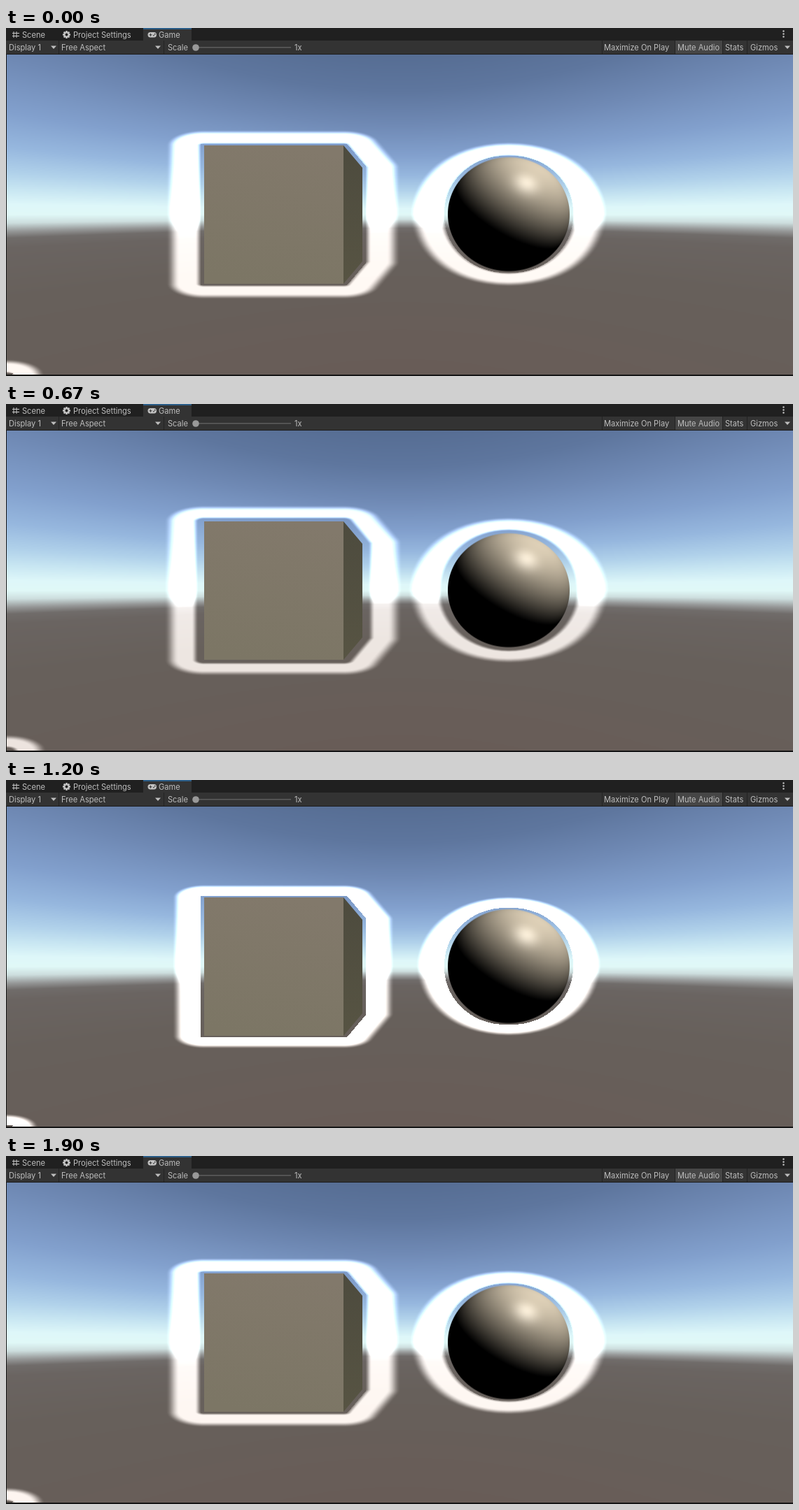
An HTML page with a canvas that plays this animation: 1124x498 px, repeating every 1.93 s.

```html
<!DOCTYPE html>
<html lang="en">
<head>
<meta charset="utf-8">
<title>Outline glow</title>
<style>
  html, body { margin: 0; width: 100%; height: 100%; overflow: hidden; background: #161616; }
  canvas { display: block; }
</style>
</head>
<body>
<canvas id="stage" width="1124" height="498"></canvas>
<script>
const W = 1124, H = 498, LOOP = 1930, STEP = 100 / 3;
const VIEW = { x: 1, y: 38, w: 1123, h: 458 };
const ASPECT = 2.45;            // the glow spreads this much wider than high
const REACH = 60, GAP = 5;
const ctx = document.getElementById('stage').getContext('2d');

const clamp = (v, a, b) => Math.min(b, Math.max(a, v));
const smooth = (a, b, v) => {
  const k = clamp((v - a) / (b - a), 0, 1);
  return k * k * (3 - 2 * k);
};

// ---- sky and ground: colour by elevation angle in degrees ----
const SKY = [
  [-30, 104, 92, 87], [-10, 103, 96, 91], [-4, 106, 100, 97], [-2.8, 112, 108, 106],
  [-2, 150, 152, 152], [-1, 205, 222, 222], [0, 224, 248, 247], [1.2, 222, 247, 249],
  [3, 200, 230, 242], [5, 176, 209, 234], [8, 150, 183, 222], [12, 130, 160, 205],
  [18, 111, 137, 180], [24, 94, 118, 158], [30, 86, 109, 147]
];

function skyColor(angle) {
  let i = 1;
  while (i < SKY.length - 1 && SKY[i][0] < angle) i++;
  const a = SKY[i - 1], b = SKY[i];
  const k = clamp((angle - a[0]) / (b[0] - a[0]), 0, 1);
  return [1, 2, 3].map(c => a[c] + (b[c] - a[c]) * k);
}

function makeBackdrop() {
  const img = ctx.createImageData(VIEW.w, VIEW.h);
  for (let y = 0; y < VIEW.h; y++) {
    for (let x = 0; x < VIEW.w; x++) {
      const angle = Math.atan2(VIEW.h / 2 - y - 0.5, Math.hypot(397, x - VIEW.w / 2)) * 180 / Math.PI;
      const [r, g, b] = skyColor(angle);
      img.data.set([r, g, b, 255], (y * VIEW.w + x) * 4);
    }
  }
  return img;
}

// ---- silhouettes, clockwise ----
const BALL = { x: 718, y: 266.5, rx: 87, ry: 81.5 };
const cube = [[283, 168], [482, 168], [509, 200], [509, 334], [482, 366], [283, 366]];
const ball = Array.from({ length: 72 }, (_, i) => {
  const a = i / 72 * Math.PI * 2;
  return [BALL.x + BALL.rx * Math.cos(a), BALL.y + BALL.ry * Math.sin(a)];
});
const corner = [[-6, 496], [1, 496], [-6, 502]];

function toEdges(points) {
  const p = points.map(([x, y]) => [x, y * ASPECT]);
  return p.map(([x, y], i) => {
    const [x2, y2] = p[(i + 1) % p.length];
    const dx = x2 - x, dy = y2 - y, len = Math.hypot(dx, dy);
    return { x, y, dx, dy, len2: len * len, nx: dy / len, ny: -dx / len };
  });
}

// Distance outside the shape, or -1 inside its inflated silhouette
function distance(edges, px, py) {
  let best = Infinity, inside = true;
  for (const e of edges) {
    const qx = px - e.x, qy = py - e.y;
    if (qx * e.nx + qy * e.ny > GAP * (Math.abs(e.nx) + Math.abs(e.ny))) inside = false;
    const k = clamp((qx * e.dx + qy * e.dy) / e.len2, 0, 1);
    const ax = qx - k * e.dx, ay = qy - k * e.dy;
    best = Math.min(best, ax * ax + ay * ay);
  }
  return inside ? -1 : Math.sqrt(best);
}

function makeField() {
  const near = new Float32Array(VIEW.w * VIEW.h).fill(REACH);
  for (const points of [cube, ball, corner]) {
    const edges = toEdges(points);
    const xs = points.map(p => p[0] - VIEW.x), ys = points.map(p => p[1] - VIEW.y);
    const x0 = Math.max(0, Math.floor(Math.min(...xs) - REACH));
    const x1 = Math.min(VIEW.w, Math.ceil(Math.max(...xs) + REACH));
    const y0 = Math.max(0, Math.floor(Math.min(...ys) - REACH / ASPECT));
    const y1 = Math.min(VIEW.h, Math.ceil(Math.max(...ys) + REACH / ASPECT));
    for (let y = y0; y < y1; y++) {
      for (let x = x0; x < x1; x++) {
        const d = distance(edges, x + VIEW.x + 0.5, (y + VIEW.y + 0.5) * ASPECT);
        const i = y * VIEW.w + x;
        near[i] = Math.min(near[i], d);
      }
    }
  }
  const cells = [];
  near.forEach((d, i) => { if (d >= 0 && d < REACH) cells.push(i); });
  return { near, cells };
}

// ---- solids ----
function makeBall() {
  const c = document.createElement('canvas');
  c.width = 180; c.height = 170;
  const g = c.getContext('2d'), img = g.createImageData(180, 170);
  for (let y = 0; y < 170; y++) {
    for (let x = 0; x < 180; x++) {
      let nx = (x + 0.5 - 90) / BALL.rx, ny = (85 - y - 0.5) / BALL.ry;
      const r = Math.hypot(nx, ny);
      if (r > 1) { nx /= r; ny /= r; }
      const nz = Math.sqrt(Math.max(0, 1 - nx * nx - ny * ny));
      const light = Math.max(0, nx * 0.5 + ny * 0.79 + nz * 0.35);
      const shine = Math.pow(Math.max(0, nx * 0.28 + ny * 0.53 + nz * 0.8), 45) * 62;
      const alpha = clamp((1 - r) * 84 + 0.5, 0, 1) * 255;
      img.data.set([222 * light + shine, 208 * light + shine, 183 * light + shine, alpha], (y * 180 + x) * 4);
    }
  }
  g.putImageData(img, 0, 0);
  return c;
}

function fillPoly(points, fill) {
  ctx.fillStyle = fill;
  ctx.beginPath();
  points.forEach(([x, y]) => ctx.lineTo(x, y));
  ctx.fill();
}

function shade(x0, y0, x1, y1, from, to) {
  const g = ctx.createLinearGradient(x0, y0, x1, y1);
  g.addColorStop(0, from);
  g.addColorStop(1, to);
  return g;
}

function drawSolids() {
  fillPoly([cube[0], cube[1], cube[4], cube[5]], shade(400, 168, 360, 366, '#82796b', '#7c7665'));
  fillPoly(cube.slice(1, 5), shade(0, 168, 0, 366, '#4d4b3e', '#575443'));
  ctx.drawImage(ballImage, BALL.x - 90, BALL.y - 85);
}

// ---- editor bars ----
const rect = (x, y, w, h, fill) => { ctx.fillStyle = fill; ctx.fillRect(x, y, w, h); };
const dot = (x, y, r, fill) => {
  ctx.fillStyle = fill;
  ctx.beginPath();
  ctx.arc(x, y, r, 0, Math.PI * 2);
  ctx.fill();
};
const label = (s, x, y) => { ctx.fillStyle = '#bebebe'; ctx.fillText(s, x, y); };
const arrow = x => fillPoly([[x - 4, 25.5], [x + 4, 25.5], [x, 30]], '#bebebe');

function drawIcons() {
  const ink = '#c4c4c4';
  for (const o of [0, 4]) {
    rect(10.5 + o, 5, 1, 9, ink);
    rect(9, 7 + o, 10, 1, ink);
  }
  ctx.strokeStyle = ink;
  ctx.lineWidth = 2.4;
  for (let i = 0; i < 4; i++) {
    const a = i * Math.PI / 4, c = Math.cos(a) * 5.5, s = Math.sin(a) * 5.5;
    ctx.beginPath();
    ctx.moveTo(86.5 - c, 9.5 - s);
    ctx.lineTo(86.5 + c, 9.5 + s);
    ctx.stroke();
  }
  dot(86.5, 9.5, 4.3, ink);
  dot(86.5, 9.5, 1.9, '#202020');
  ctx.fillStyle = ink;
  ctx.beginPath();
  ctx.roundRect(202.5, 6, 12.5, 7.5, 3.7);
  ctx.fill();
  rect(204.5, 9.3, 4, 1, '#333');
  rect(206, 7.8, 1, 4, '#333');
  dot(211, 10.6, 0.9, '#333');
  dot(212.7, 8.7, 0.9, '#333');
}

function drawBars() {
  rect(0, 0, W, H, '#161616');
  rect(0, 0, W, 18, '#202020');
  rect(0, 18, W, 19, '#333');
  rect(196, 0, 69, 18, '#333');
  rect(196, 0, 69, 2, '#2c5d87');
  rect(956, 18, 67, 19, '#464646');
  for (const x of [75, 225, 851, 955, 1023, 1058]) rect(x, 18, 1, 19, '#232323');
  rect(0, 37, W, 1, '#1c1c1c');

  ctx.font = '11.1px Inter, Roboto, sans-serif';
  label('Scene', 23, 14);
  label('Project Settings', 96, 14);
  label('Game', 218, 14);
  label('Display 1', 4, 32);
  label('Free Aspect', 79, 32);
  label('Scale', 231, 32);
  label('1x', 412, 32);
  label('Maximize On Play', 854, 32);
  label('Mute Audio', 959, 32);
  label('Stats', 1027, 32);
  label('Gizmos', 1063, 32);
  [68, 217, 1116].forEach(arrow);
  rect(271, 27, 136, 1.5, '#5e5e5e');
  dot(271, 28, 4.8, '#999');
  for (const y of [4.5, 8.5, 12.5]) dot(1110.5, y, 1.2, '#c4c4c4');
  drawIcons();
}

// ---- animation ----
const backdrop = makeBackdrop();
const { near, cells } = makeField();
const ballImage = makeBall();
const picture = new ImageData(new Uint8ClampedArray(backdrop.data), VIEW.w, VIEW.h);

function drawView(t) {
  const period = 632;
  const pulse = Math.abs(Math.sin(Math.PI * (t - 390) / period));
  const outer = 2 + 56 * pulse;
  const fromPeak = Math.acos(pulse) / Math.PI * period;
  const inner = 14 - 0.15 * fromPeak;
  const power = 255 * Math.min(0.75, 0.44 + 0.0022 * fromPeak) * Math.min(1, outer / 16);
  const src = backdrop.data, out = picture.data;
  for (const i of cells) {
    const d = near[i];
    const glow = power * (1 - smooth(outer * 0.64, outer, d)) * smooth(inner, inner + 10, d);
    for (let c = i * 4; c < i * 4 + 3; c++) out[c] = src[c] + glow;
  }
  ctx.putImageData(picture, VIEW.x, VIEW.y);
  drawSolids();
}

let start = null, shown = -1;
function tick(now) {
  if (start === null) start = now;
  const step = Math.floor(((now - start) % LOOP + 3.4) / STEP);
  if (step !== shown) {
    shown = step;
    drawView(step * STEP);
  }
  requestAnimationFrame(tick);
}

drawBars();
drawView(0);
requestAnimationFrame(tick);
</script>
</body>
</html>
```
